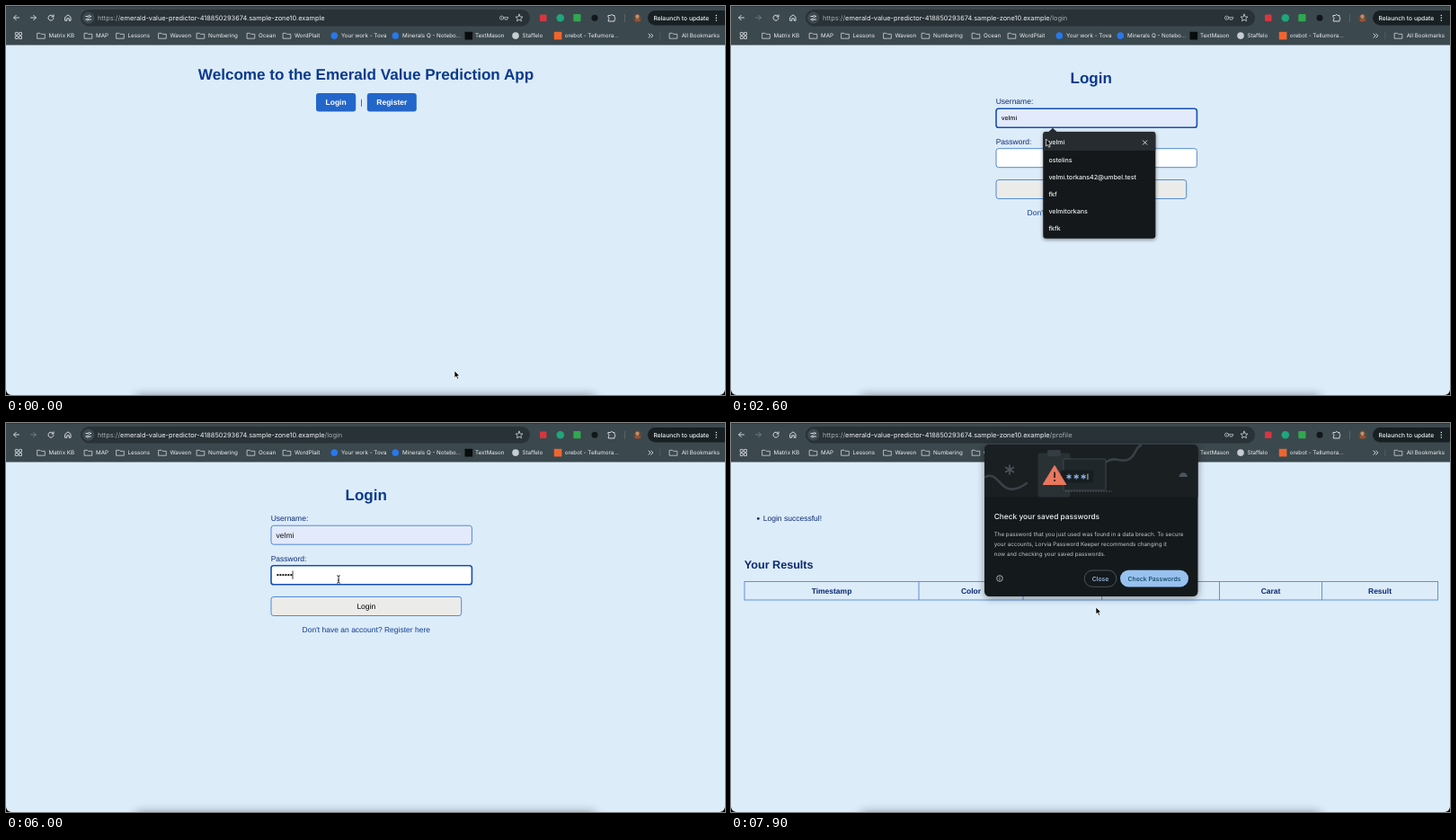
An HTML page for the animation above (8 s loop, 800 by 433 pixels).

```html
<!DOCTYPE html>
<html lang="en">
<head>
<meta charset="utf-8">
<title>Emerald Value Prediction App</title>
<style>
  html, body { margin: 0; width: 100%; height: 100%; overflow: hidden; background: #ddecf9; }
  svg { position: absolute; display: block; text-rendering: geometricPrecision; }
  #stage { left: 0; top: 0; width: 800px; height: 433px; }
  #dialog { left: 282px; top: 24px; width: 237.5px; height: 169px; overflow: visible; transform-origin: 50% 100%; }
  .ui { font-family: Inter, Roboto, sans-serif; }
  .web { font-family: "Liberation Sans", Arial, sans-serif; }
  .b { font-weight: 700; }
  .m { font-weight: 500; }
  .mid { text-anchor: middle; }
  .ico { fill: none; stroke: #e4e9eb; stroke-width: .9; stroke-linecap: round; stroke-linejoin: round; }
</style>
</head>
<body>
<svg id="stage" viewBox="0 0 800 433">
  <defs>
    <filter id="soft" x="-20%" y="-300%" width="140%" height="700%"><feGaussianBlur stdDeviation="5.5"/></filter>
    <filter id="shade" x="-20%" y="-20%" width="140%" height="140%"><feGaussianBlur stdDeviation="2"/></filter>
  </defs>
  <rect width="800" height="433" fill="#ddecf9"/>
  <g id="home"></g>
  <g id="login"></g>
  <g id="profile"></g>
  <rect x="145" y="434" width="510" height="14" fill="#1a2530" opacity=".55" filter="url(#soft)"/>
  <path d="M0 427V433H6A6 6 0 0 1 0 427ZM800 427V433H794A6 6 0 0 0 800 427Z" fill="#000"/>
  <g id="chrome"></g>
  <g id="popup"></g>
  <g id="arrow"><path d="M0 0V8L1.9 6.3L3.2 9.2L4.6 8.6L3.3 5.8H5.8Z" fill="#000" stroke="#fff" stroke-width=".7" stroke-linejoin="round"/></g>
  <g id="beam" fill="none"><path d="M-1.8 -4.2Q0 -4.2 0 -3Q0 -4.2 1.8 -4.2M0 -3V3M-1.8 4.2Q0 4.2 0 3Q0 4.2 1.8 4.2M-.9 1H.9" stroke="#111" stroke-width=".9"/></g>
</svg>
<svg id="dialog" viewBox="282 24 237.5 169"></svg>

<script>
const $ = id => document.getElementById(id);
const NAVY = '#0a2a72', TITLE = '#0b3a8c', EDGE = '#4f8ad6';

const text = (x, y, s, size, fill, cls) =>
  `<text x="${x}" y="${y}" font-size="${size}" fill="${fill}" class="${cls}">${s}</text>`;
const rect = (x, y, w, h, r, fill, more = '') =>
  `<rect x="${x}" y="${y}" width="${w}" height="${h}" rx="${r}" fill="${fill}" ${more}/>`;
const circle = (x, y, r, fill, more = '') =>
  `<circle cx="${x}" cy="${y}" r="${r}" fill="${fill}" ${more}/>`;
const icon = (d, more = '') => `<path class="ico" d="${d}" ${more}/>`;
const web = (x, y, s, size = 8.5, fill = NAVY, cls = '') => text(x, y, s, size, fill, 'web ' + cls);
const ui = (x, y, s, size = 6.25, fill = '#eef1f2', cls = '') => text(x, y, s, size, fill, 'ui ' + cls);

function drawChrome() {
  const folder = x => icon(`M${x} 30.3H${x + 3}L${x + 4} 31.3H${x + 8.3}V36.2H${x}Z`, 'style="stroke-width:.7"');
  let s = rect(0, 0, 800, 43.5, 0, '#3b484e') + rect(0, 0, 800, .8, 0, '#2b3439');

  // navigation
  s += icon('M14.5 13H8.8M11.3 10.3L8.6 13L11.3 15.7');
  s += `<g id="forward">${icon('M27.5 13H33.2M30.7 10.3L33.4 13L30.7 15.7')}</g>`;
  s += icon('M52.6 11.6A3 3 0 1 0 53 13.6M53 9.8V12H50.8');
  s += icon('M66 12.3L69 9.9L72 12.3V16.3H70.2V13.8H67.8V16.3H66Z');

  // address field
  s += rect(83, 4, 500, 18.5, 9.2, '#283237') + circle(91.7, 13.2, 6.6, '#3d494f');
  s += icon('M88.8 11.5H91M94 11.5H94.6M88.8 15H89.4M92.4 15H94.6');
  s += circle(92.6, 11.5, 1.1, 'none', 'stroke="#e4e9eb" stroke-width=".8"');
  s += circle(90.8, 15, 1.1, 'none', 'stroke="#e4e9eb" stroke-width=".8"');
  s += ui(102, 15.8, '<tspan fill="#a5aeb2">https://</tspan>emerald-value-predictor-418850293674.sample-zone10.example<tspan id="path" fill="#a5aeb2"></tspan>', 7.4);
  s += `<g id="key" opacity=".85">${circle(551.5, 13.2, 2.1, 'none', 'stroke="#d5dbde" stroke-width=".8"')}${circle(551.5, 13.2, .6, '#d5dbde')}${icon('M553.6 12.5H558.7V14H557.5V15.2H555.5V14H553.6', 'style="stroke-width:.7"')}</g>`;
  s += icon('M571 9.2L572.1 11.9L575 12.1L572.8 14L573.5 16.8L571 15.3L568.5 16.8L569.2 14L567 12.1L569.9 11.9Z', 'style="stroke-width:.7"');

  // extensions
  s += rect(594, 9.5, 7.5, 7.5, 1, '#d8363f') + circle(616.8, 13.3, 4.3, '#1fa67a');
  s += rect(631.3, 9, 8.2, 8.2, 1, '#2fa84f') + circle(655, 13.2, 3.5, '#12171a');
  s += icon('M670.3 10.5H672.6A1.4 1.4 0 0 1 675.2 10.5H677V12.6A1.4 1.4 0 0 1 677 15.2V17H670.3V14.9A1.3 1.3 0 0 0 670.3 12.5Z');
  s += rect(688.2, 9, .8, 9, 0, '#5d6a70');
  s += circle(702.8, 13.2, 5.3, '#4f4a42') + circle(702.5, 11.8, 2.2, '#c78d66') + rect(699.5, 14, 6.5, 3.3, 1.6, '#9c5233');
  s += rect(714, 5, 92, 16.5, 8.2, '#182023') + ui(720.5, 15.7, 'Relaunch to update', 6.7, '#f2f5f6', 'm');
  for (const y of [10.4, 13.2, 16]) s += circle(790.3, y, .75, '#eef1f2');

  // bookmarks
  for (const x of [10.3, 14.6]) for (const y of [29.4, 33.6])
    s += rect(x, y, 2.9, 2.9, .3, 'none', 'stroke="#e4e9eb" stroke-width=".8"');
  [[35, 'Matrix KB'], [87.5, 'MAP'], [123, 'Lessons'], [170, 'Waveon'], [212.5, 'Numbering'],
   [268.5, 'Ocean'], [308.5, 'WordPlait']].forEach(([x, name]) => s += folder(x) + ui(x + 12.5, 35.3, name));
  s += circle(365.3, 33.1, 3.8, '#2878ec') + ui(373, 35.3, 'Your work - Tova');
  s += circle(433.3, 33.1, 3.8, '#2878ec') + ui(441, 35.3, 'Minerals Q - Notebo...');
  s += rect(510.5, 28.8, 8.6, 8.6, .5, '#090c0d') + ui(522, 35.3, 'TextMason');
  s += circle(567, 33.1, 3.8, '#c7ced1') + ui(574.5, 35.3, 'Staffelo');
  s += rect(609.8, 28.8, 8.6, 8.6, 0, '#f0652f') + ui(621.7, 35.3, 'orebot - Tellumora...');
  s += icon('M715 31L717 33.1L715 35.2M717.8 31L719.8 33.1L717.8 35.2');
  s += rect(727.5, 29, .7, 8, 0, '#56636a') + folder(738.5) + ui(751.7, 35.3, 'All Bookmarks');
  $('chrome').innerHTML = s;
}

function drawPages() {
  const button = (x, w, s) => rect(x, 97, w, 20.6, 3, '#2366c9') + web(x + w / 2, 110.2, s, 8.5, '#fff', 'b mid');
  $('home').innerHTML = web(400.5, 82, 'Welcome to the Emerald Value Prediction App', 17.1, TITLE, 'b mid') +
    button(345, 44.2, 'Login') + web(395.3, 110, '|', 8.5, NAVY, 'mid') + button(401.8, 55, 'Register');

  const box = (id, y, w, fill) => rect(295, y, w, 21, 2.8, fill, `id="${id}" stroke="${EDGE}"`);
  let dots = '';
  for (let i = 0; i < 6; i++) dots += circle(302.4 + i * 3, 169.2, 1.15, '#111', 'class="dot"');
  $('login').innerHTML = web(400.7, 86, 'Login', 17, TITLE, 'b mid') +
    web(294.7, 109, 'Username:') + box('user', 114.2, 223.4, '#fff') +
    `<g id="preview">${ui(300.7, 127.3, 'velmi', 6.9, '#111', 'm')}</g>` +
    `<g id="filled">${web(300.6, 127.7, 'velmi', 8.5, '#111')}</g>` +
    web(294.7, 153.6, 'Password:') + box('pass', 158.7, 223.4, '#fff') + dots +
    rect(0, 0, .8, 9.5, 0, '#111', 'id="caret"') +
    box('submit', 193.5, 211.7, '#ebebea') + web(400.8, 206.8, 'Login', 8.5, '#000', 'mid') +
    web(400.8, 233, "Don't have an account? Register here", 8.5, '#0e3c90', 'mid');

  let p = web(400.6, 86, 'Welcome, Velmi Torkans', 17, TITLE, 'b mid') +
    circle(30.3, 106.4, 1.4, NAVY) + web(35.8, 109, 'Login successful!') +
    web(324.2, 132.7, 'Predict Emerald Value', 8.5, '#124a a6'.replace(' ', ''), 'b') +
    web(431.7, 132.7, '|', 8.5, NAVY, 'mid') + web(448.2, 132.7, 'Logout', 8.5, '#124aa6', 'b') +
    web(14.8, 162.3, 'Your Results', 12.6, NAVY, 'b') +
    rect(15, 176.5, 771.5, 20.5, 0, 'none', `stroke="${EDGE}" stroke-width=".9"`);
  const edges = [15, 209, 325, 412.7, 543.5, 657.5, 786.5];
  ['Timestamp', 'Color', 'Cut', 'Clarity', 'Carat', 'Result'].forEach((s, i) => {
    if (i) p += `<path d="M${edges[i]} 176.5V197" stroke="${EDGE}" stroke-width=".9"/>`;
    p += web((edges[i] + edges[i + 1]) / 2, 189.6, s, 8.5, NAVY, 'b mid');
  });
  $('profile').innerHTML = p;
}

function drawPopup() {
  const rows = ['velmi', 'ostelins', 'velmi.torkans42@umbel.test', 'fkf', 'velmitorkans', 'fkfk'];
  $('popup').innerHTML = rect(347.5, 141, 125, 119, 3, '#000', 'opacity=".45" filter="url(#shade)"') +
    '<path d="M353 140.6L358 135.8L363 140.6Z" fill="#24292b"/>' +
    rect(347.3, 140, 125, 118.8, 3.2, '#14181a') +
    `<g id="hover"><path d="M347.3 161V143.2A3.2 3.2 0 0 1 350.5 140H469.1A3.2 3.2 0 0 1 472.3 143.2V161Z" fill="#262c2f"/>${icon('M458.4 149.8L462.8 154.2M462.8 149.8L458.4 154.2')}</g>` +
    rows.map((s, i) => ui(353.4, 154.4 + i * 19.1, s, 7.1, '#f0f3f4', 'm')).join('');
}

function drawDialog() {
  const star = (x, y, r, c, w) => [30, 90, 150].map(a =>
    `<path d="M${x - r} ${y}H${x + r}" stroke="${c}" stroke-width="${w}" stroke-linecap="round" transform="rotate(${a} ${x} ${y})"/>`).join('');
  const wave = d => `<path d="${d}" fill="none" stroke="#384147" stroke-width="2.6" stroke-linecap="round"/>`;
  $('dialog').innerHTML =
    rect(282, 26, 237.5, 169, 6, '#000', 'opacity=".4" style="filter:blur(4px)"') +
    rect(282, 24, 237.5, 169, 5.5, '#14191b') +
    '<path d="M282 82.5V29.5A5.5 5.5 0 0 1 287.5 24H514A5.5 5.5 0 0 1 519.5 29.5V82.5Z" fill="#1a1f22"/>' +
    wave('M283 60C291 56 295 62 302 69S318 75 329 67') +
    wave('M416 44C429 36 431 44 441 41S449 27 456 25') +
    star(310, 52, 5, '#4b555a', 1.7) +
    '<path d="M498.5 60A4.7 4.7 0 0 1 508 60Z" fill="#4b555a"/>' +
    rect(341.5, 33.5, 36, 49, 3, '#2a3135') + rect(352, 30, 15, 7, 2, '#343d42') +
    rect(370, 40, 47, 35, 1.5, '#20272a', 'stroke="#465056" stroke-width=".8"') +
    rect(367, 52.5, 36, 14, 2, '#171d20') +
    '<path d="M372 76H424" stroke="#59646a" stroke-width=".8" stroke-dasharray="2 1"/>' +
    '<path d="M360 48L372.4 68.3H347.6Z" fill="#e9775e" stroke="#e9775e" stroke-width="1.5" stroke-linejoin="round"/>' +
    rect(359.2, 54.5, 1.7, 6.5, .5, '#2b2020') + circle(360, 64, 1.1, '#2b2020') +
    [376, 384.2, 392.2].map(x => star(x, 59.7, 2.5, '#8fbcf0', 1)).join('') +
    rect(396.5, 56.5, .9, 6.5, 0, '#c3d6ea') +
    ui(292.7, 107.2, 'Check your saved passwords', 8.35, '#eef2f3', 'm') +
    ['The password that you just used was found in a data breach. To secure',
     'your accounts, Lorvia Password Keeper recommends changing it',
     'now and checking your saved passwords.'].map((s, i) => ui(292.7, 126.4 + i * 10.6, s, 6.25, '#c2c9cc')).join('') +
    circle(299, 173, 3.3, 'none', 'stroke="#c9d0d3" stroke-width=".8"') +
    rect(298.6, 172.4, .8, 2.5, 0, '#c9d0d3') + rect(298.6, 171, .8, .8, 0, '#c9d0d3') +
    rect(393.2, 164, 35.6, 18.3, 9.1, 'none', 'stroke="#5d7079" stroke-width=".7"') +
    ui(411, 175.5, 'Close', 6.9, '#a4c8f5', 'm mid') +
    rect(433, 163.7, 76, 18.8, 9.4, '#98c1f0') +
    ui(471, 175.5, 'Check Passwords', 6.9, '#0c4259', 'm mid');
}

// pointer stops: time, x, y
const stops = [[0, 499, 406], [900, 367, 104], [1100, 367, 104], [1700, 335, 122], [1900, 336, 124],
  [2500, 350.5, 148], [3000, 350.5, 148], [3500, 348, 167], [5900, 348, 167], [6000, 370, 174],
  [6500, 399, 202], [6700, 400, 203], [7000, 406, 205], [8000, 406, 205]];
const keys = [4200, 4500, 4800, 5000, 5300, 5500];

function pointer(t) {
  const i = Math.max(1, stops.findIndex(s => s[0] >= t));
  const [a, ax, ay] = stops[i - 1], [b, bx, by] = stops[i];
  const u = (t - a) / (b - a), k = u * u * (3 - 2 * u);
  return [ax + (bx - ax) * k, ay + (by - ay) * k];
}

const show = (id, on) => $(id).style.display = on ? '' : 'none';

function focus(id, on) {
  $(id).setAttribute('stroke', on ? '#1450b4' : EDGE);
  $(id).setAttribute('stroke-width', on ? 1.6 : 1);
}

function render(time) {
  const t = Math.floor(time / 100) * 100;
  const page = t < 1100 ? 'home' : t < 7000 ? 'login' : 'profile';
  const [x, y] = pointer(t);
  const open = t >= 2000 && t < 2700;
  const hover = open && x > 347.3 && y > 140;
  const filled = t >= 2700;
  const typing = t >= 3500 && t < 6500;

  for (const id of ['home', 'login', 'profile']) show(id, id === page);
  $('path').textContent = page === 'home' ? '' : '/' + page;
  $('forward').setAttribute('opacity', page === 'home' ? 1 : .35);
  show('key', t < 2700 || page === 'profile');

  show('popup', open);
  show('hover', hover);
  show('preview', hover);
  show('filled', filled);
  $('user').setAttribute('fill', hover || filled ? '#e3eafb' : '#fff');
  focus('user', t >= 2000 && t < 3500);
  focus('pass', typing);

  const count = keys.filter(k => t >= k).length;
  document.querySelectorAll('.dot').forEach((d, i) => d.style.display = i < count ? '' : 'none');
  show('caret', (open && !hover) || (typing && !(t >= 3800 && t < 4000)));
  $('caret').setAttribute('x', 300.6 + count * 3);
  $('caret').setAttribute('y', open ? 120 : 164.4);

  const inBox = x > 295 && x < 518 && ((y > 114 && y < 135) || (y > 158 && y < 180));
  const beam = page === 'login' && inBox;
  show('beam', beam);
  show('arrow', !beam);
  $(beam ? 'beam' : 'arrow').setAttribute('transform', `translate(${x} ${y})`);

  // the dialog tips forward into place while it fades in
  const p = t < 7200 ? 0 : Math.min(1, .19 + (t - 7200) / 300 * .81);
  const q = (1 - p) / .81, d = $('dialog').style;
  d.opacity = p;
  d.transform = q > 0 ? `translateY(${-9 * q}px) scaleY(${1 + .15 * q}) perspective(768px) rotateX(${20 * q}deg)` : 'none';
}

drawChrome();
drawPages();
drawPopup();
drawDialog();
const start = performance.now();
function tick() {
  render((performance.now() - start) % 8000);
  requestAnimationFrame(tick);
}
tick();
</script>
</body>
</html>
```
